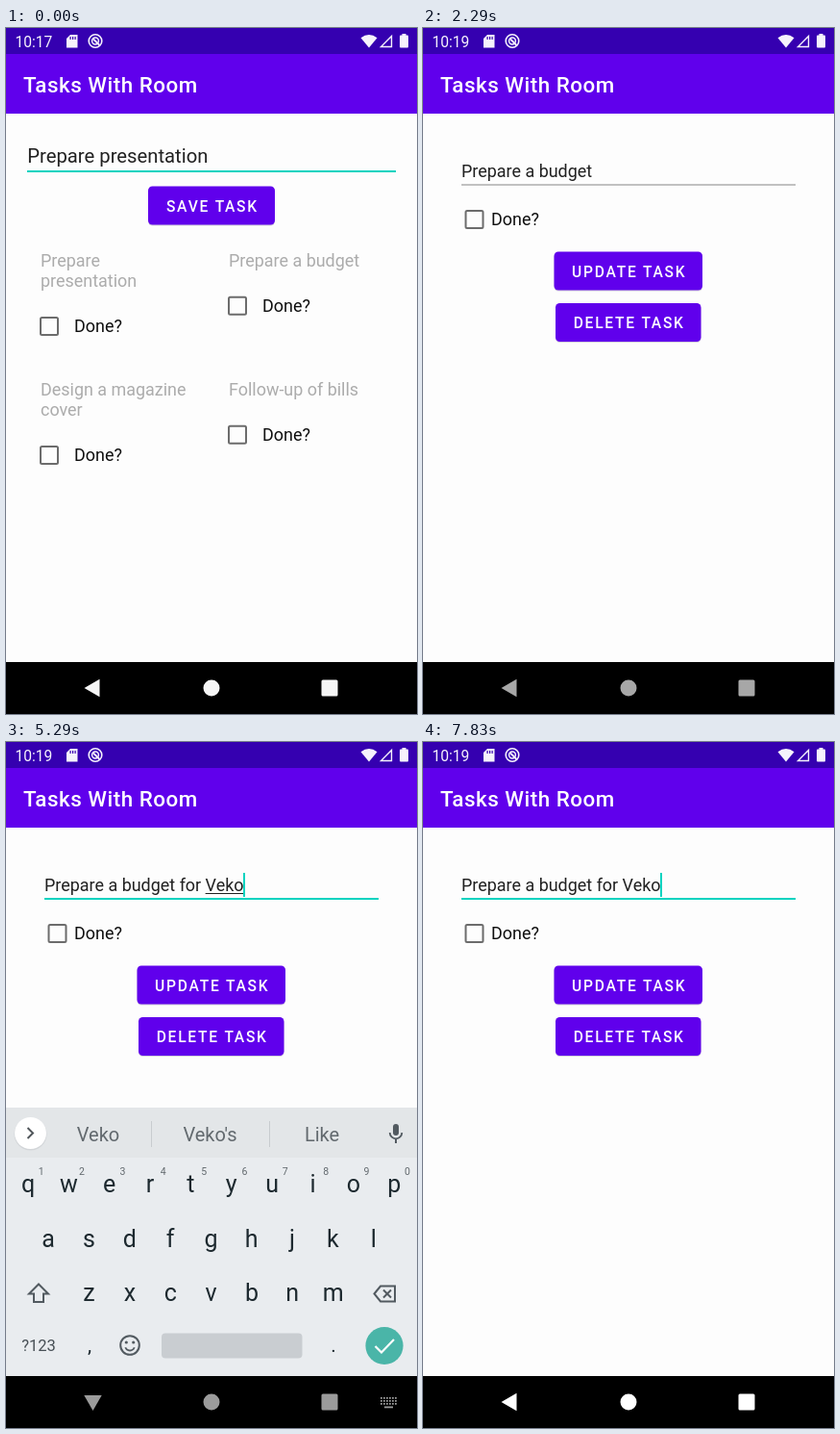
These frames come from a looping animation (428x713 px, 8 s). An HTML page with a canvas:

```html
<!DOCTYPE html>
<html lang="en">
<head>
<meta charset="utf-8">
<title>Tasks</title>
<style>
html, body { margin: 0; width: 100%; height: 100%; overflow: hidden; background: #000; }
canvas { display: block; width: 428px; height: 713px; }
</style>
</head>
<body>
<canvas id="stage"></canvas>
<script>
const W = 428, H = 713, LOOP = 8000;
const canvas = document.getElementById('stage');
const dpr = window.devicePixelRatio || 1;
canvas.width = W * dpr;
canvas.height = H * dpr;
const c = canvas.getContext('2d');

const PAPER = '#fdfdfd', INK = '#212121', PURPLE = '#6000ec', DEEP = '#3500b0', ACCENT = '#08d3c0';
const BOX = '#6c6c6c', KEY = '#1d292f', ICON = '#525a60';
const BODY = 17.95;
const BASE = 'Prepare a budget', ADDED = ' for Veko';
const STROKES = [3500, 3620, 3750, 3960, 4100, 4250, 4750, 5080, 5210];
const HINTS = ['budget Budget budgets', 'for and of', 'f for from', 'fo for of', 'for form four',
  'the a me', 'V Very Via', 'Ve Very Vet', 'Vek Week Very', "Veko Veko's Like"];
const COMMIT = 6750;

const clamp = x => Math.max(0, Math.min(1, x));
const ramp = (t, a, b) => clamp((t - a) / (b - a));
const easeOut = x => 1 - (1 - x) ** 3;
const easeIn = x => x * x;
const lerp = (a, b, k) => a + (b - a) * k;
const gray = v => `rgb(${v}, ${v}, ${v})`;

function rect(x, y, w, h, fill, r = 0) {
  c.fillStyle = fill;
  c.beginPath();
  c.roundRect(x, y, w, h, r);
  c.fill();
}
function disc(x, y, r, fill) {
  c.fillStyle = fill;
  c.beginPath();
  c.arc(x, y, r, 0, 7);
  c.fill();
}
function arc(x, y, r, color, width, from = 0, to = 7) {
  c.strokeStyle = color;
  c.lineWidth = width;
  c.beginPath();
  c.arc(x, y, r, from, to);
  c.stroke();
}
function poly(points, fill) {
  c.fillStyle = fill;
  c.beginPath();
  points.forEach(p => c.lineTo(...p));
  c.closePath();
  c.fill();
}
function line(points, color, width, close) {
  c.strokeStyle = color;
  c.lineWidth = width;
  c.beginPath();
  points.forEach(p => c.lineTo(...p));
  if (close) c.closePath();
  c.stroke();
}
function text(s, x, y, size, color, { weight = 400, align = 'left', gap = 0 } = {}) {
  c.font = `${weight} ${size}px Roboto, sans-serif`;
  c.letterSpacing = gap + 'px';
  c.textAlign = align;
  c.fillStyle = color;
  c.fillText(s, x, y);
  return c.measureText(s).width;
}
function faded(alpha, draw) {
  if (alpha <= 0) return;
  c.save();
  c.globalAlpha *= alpha;
  draw();
  c.restore();
}

function button(label, x, y, w) {
  rect(x, y + 1, w, 40, '#d4d2dc', 4.5);
  rect(x, y, w, 40, PURPLE, 4.5);
  text(label, x + w / 2 + .9, y + 26, 15.6, '#ffffff', { weight: 500, align: 'center', gap: 1.75 });
}
function checkbox(x, y, labelX) {
  c.strokeStyle = BOX;
  c.lineWidth = 2;
  c.beginPath();
  c.roundRect(x - 9, y - 9, 18, 18, 1.5);
  c.stroke();
  text('Done?', labelX, y + 6.3, BODY, '#101010');
}
function appFrame() {
  rect(0, 0, W, H, PAPER);
  rect(0, 0, W, 27, DEEP);
  rect(0, 27, W, 62, PURPLE);
  text('Tasks With Room', 18, 67, 22.4, '#ffffff', { weight: 500, gap: .5 });
}

function card(x, y, lines, k, boxY) {
  faded(k, () => {
    rect(x - 1, y, 182, 119.5, '#e2e2e2', 5);
    rect(x, y, 180, 117, '#fefefe', 4);
  });
  lines.forEach((s, i) => text(s, x + 10, y + 28 + 21.2 * i, BODY, gray(lerp(172, 128, k))));
  checkbox(x + 19, boxY, x + 45);
}
function listScreen(t) {
  const k = ramp(t, 40, 480);
  appFrame();
  text('Prepare presentation', 22.3, 140, 20.25, INK);
  rect(22, 148, 384, 2, ACCENT);
  button('SAVE TASK', 148, 164.5, 132);
  card(26, 220, ['Prepare', 'presentation'], k, 310);
  card(222, 220, ['Prepare a budget'], k, 288.7);
  card(26, 354, ['Design a magazine', 'cover'], k, 444);
  card(222, 354, ['Follow-up of bills'], k, 422.7);
  faded(.1 * ramp(t, 1760, 1900), () => {
    c.beginPath();
    c.roundRect(222, 220, 180, 117, 4);
    c.clip();
    disc(310, 270, 20 + 110 * easeOut(ramp(t, 1760, 2050)), '#000000');
  });
}

const typed = t => STROKES.filter(s => t >= s).length;

// The caret blinks every half second, starting anew at each edit.
function cursorOn(t) {
  if (t < 2750) return false;
  const resets = [2750, ...STROKES, COMMIT].filter(s => s <= t);
  return Math.floor((t - resets[resets.length - 1]) / 500) % 2 === 0;
}

function detailScreen(t) {
  const n = typed(t), value = BASE + ADDED.slice(0, n);
  appFrame();
  const end = 40 + text(value, 40, 155, BODY, INK);
  const focus = ramp(t, 2710, 2830);
  rect(40, 162.5, 348, 1, '#858585');
  faded(focus, () => rect(40, 162, 348, 2, ACCENT));
  if (focus && t < COMMIT) {
    const word = value.slice(value.lastIndexOf(' ') + 1);
    const w = c.measureText(word).width;
    rect(end - w, 157, w, 1, INK);
  }
  if (cursorOn(t)) rect(end - .5, 136, 2, 25, ACCENT);
  if (t >= 2800 && n === 0) {
    disc(end, 175.5, 11, ACCENT);
    poly([[end, 161.5], [end + 7.8, 168], [end - 7.8, 168]], ACCENT);
  }
  checkbox(53.5, 199, 71);
  button('UPDATE TASK', 136.5, 232.5, 154.5);
  button('DELETE TASK', 138, 286, 151.5);
}

function keyRow(keys, x, y) {
  [...keys].forEach((k, i) => text(k, x + 42.35 * i, y, 25, KEY, { align: 'center' }));
}
function keyboard(t) {
  rect(0, 380, W, 290, '#e9ecef');
  rect(0, 380, W, 52, '#e3e6e8');
  disc(25.5, 407.5, 17, '#d3d6d9');
  disc(25.5, 406.5, 16.5, '#ffffff');
  line([[22.5, 401], [28, 406.5], [22.5, 412]], '#50565a', 2);

  if (t < COMMIT) {
    HINTS[typed(t)].split(' ').forEach((s, i) =>
      text(s, 96 + 116.5 * i, 414.5, 20, '#62696e', { align: 'center' }));
    for (const x of [151, 274]) rect(x, 394, 1, 27, '#c8cccf');
  }
  rect(403, 397, 6, 12, ICON, 3);
  arc(406, 406, 6.3, ICON, 1.8, 0, Math.PI);
  rect(405, 412, 2, 5, ICON);

  keyRow('qwertyuiop', 23, 468);
  [...'1234567890'].forEach((d, i) => text(d, 36.7 + 42.35 * i, 450, 10.5, '#62696e', { align: 'center' }));
  keyRow('asdfghjkl', 44, 524.5);
  keyRow('zxcvbnm', 86.5, 580.5);

  line([[34, 563.5], [44, 573.5], [39, 573.5], [39, 582], [29, 582], [29, 573.5], [24, 573.5]], ICON, 2, true);
  line([[383.5, 573.5], [390, 565.5], [405, 565.5], [405, 581.5], [390, 581.5]], ICON, 2, true);
  line([[393, 569.5], [401, 577.5]], ICON, 2);
  line([[401, 569.5], [393, 577.5]], ICON, 2);

  text('?123', 34, 633, 16.5, '#474f55', { align: 'center' });
  text(',', 87, 634, 21, KEY, { align: 'center' });
  text('.', 341, 634, 21, KEY, { align: 'center' });
  arc(129, 627, 9.8, ICON, 2);
  disc(125.3, 624, 1.6, ICON);
  disc(132.7, 624, 1.6, ICON);
  arc(129, 627.5, 5, ICON, 1.8, .35, Math.PI - .35);
  rect(162, 614.5, 146.5, 26, '#c9cdd1', 4);
  disc(394, 627.5, 19.6, '#4ab5a8');
  line([[384.5, 628], [391, 634.5], [404, 621]], '#ffffff', 2.2);
}
function keyboardLevel(t) {
  return t < 5000 ? easeOut(ramp(t, 2770, 3060)) : 1 - easeIn(ramp(t, 6930, 7160));
}

function statusIcons(t) {
  const w = '#f6f3fc';
  text(t < 920 ? '10:17' : '10:19', 9.5, 19.5, 15.6, w);
  poly([[67, 7], [74.5, 7], [74.5, 20.5], [63, 20.5], [63, 11]], w);
  for (const x of [66.5, 69, 71.5]) rect(x, 9, 1.2, 3, DEEP);
  arc(93, 13.5, 6.8, w, 1.6);
  arc(93, 13.5, 3.4, w, 1.5);
  line([[91, 11.5], [97.5, 18]], w, 1.8);

  c.fillStyle = w;
  c.beginPath();
  c.moveTo(378, 20.5);
  c.lineTo(369.5, 10.3);
  c.quadraticCurveTo(378, 3.8, 386.5, 10.3);
  c.fill();
  line([[401.5, 8.5], [401.5, 19.5], [390.5, 19.5]], w, 1.4, true);
  rect(410, 7.5, 9, 13, w, 1);
  rect(412.5, 6, 4, 2, w);
}

function navShade(t) {
  const dimmed = lerp(245, 155, ramp(t, 880, 2500));
  return lerp(lerp(dimmed, 200, ramp(t, 6710, 6880)), 255, ramp(t, 6880, 7250));
}
function touchDot(x, y) {
  disc(x, y, 13, 'rgba(140, 140, 146, .6)');
  arc(x, y, 11.5, 'rgba(200, 200, 208, .5)', 2);
}
function navBar(t, level) {
  rect(0, 659, W, 54, '#000000');
  const press = ramp(t, 6740, 6860) * (1 - ramp(t, 6960, 7200));
  faded(press, () => {
    const half = 30 + 20 * ramp(t, 6740, 6860);
    rect(90 - half, 659, half * 2, 54, '#232323', 27);
  });
  const shade = navShade(t), color = gray(shade);
  if (t > 6710 && t < 6960) touchDot(91, 693);
  c.save();
  c.translate(90.5, 686);
  c.rotate(-Math.PI / 2 * level);
  poly([[-9, 0], [7, -9.2], [7, 9.2]], gray(lerp(shade, 245, press)));
  c.restore();
  disc(214, 686, 8.5, color);
  rect(328.5, 677.5, 17, 17, color, 1.5);

  faded(t < 6710 ? level : 0, () => {
    for (let row = 0; row < 3; row++)
      for (let i = 0; i < 6; i++) rect(390 + i * 3, 681 + row * 3, 1.8, 1.8, color);
    rect(394, 690.5, 9, 1.8, color);
  });
}

function touch(t, at, x, y) {
  if (t >= at && t < at + 110) touchDot(x, y);
}

function draw(t) {
  c.setTransform(dpr, 0, 0, dpr, 0, 0);
  const open = easeOut(ramp(t, 1870, 2270));
  const level = keyboardLevel(t);

  if (open < 1) {
    c.save();
    c.translate(0, -13 * open);
    listScreen(t);
    c.restore();
    faded(.1 * open, () => rect(0, 0, W, H, '#000000'));
  }
  if (open > 0) {
    c.save();
    c.beginPath();
    c.rect(0, 659 * (1 - open), W, H);
    c.clip();
    c.translate(0, 27 * (1 - open));
    detailScreen(t);
    c.restore();
  }
  faded(level, () => {
    c.translate(0, 56 * (1 - level));
    keyboard(t);
  });
  statusIcons(t);
  navBar(t, level);
  touch(t, 1750, 310, 270);
  touch(t, 2670, 230, 150);
}

const start = performance.now();
function tick() {
  draw((performance.now() - start) % LOOP);
  requestAnimationFrame(tick);
}
tick();
</script>
</body>
</html>
```
